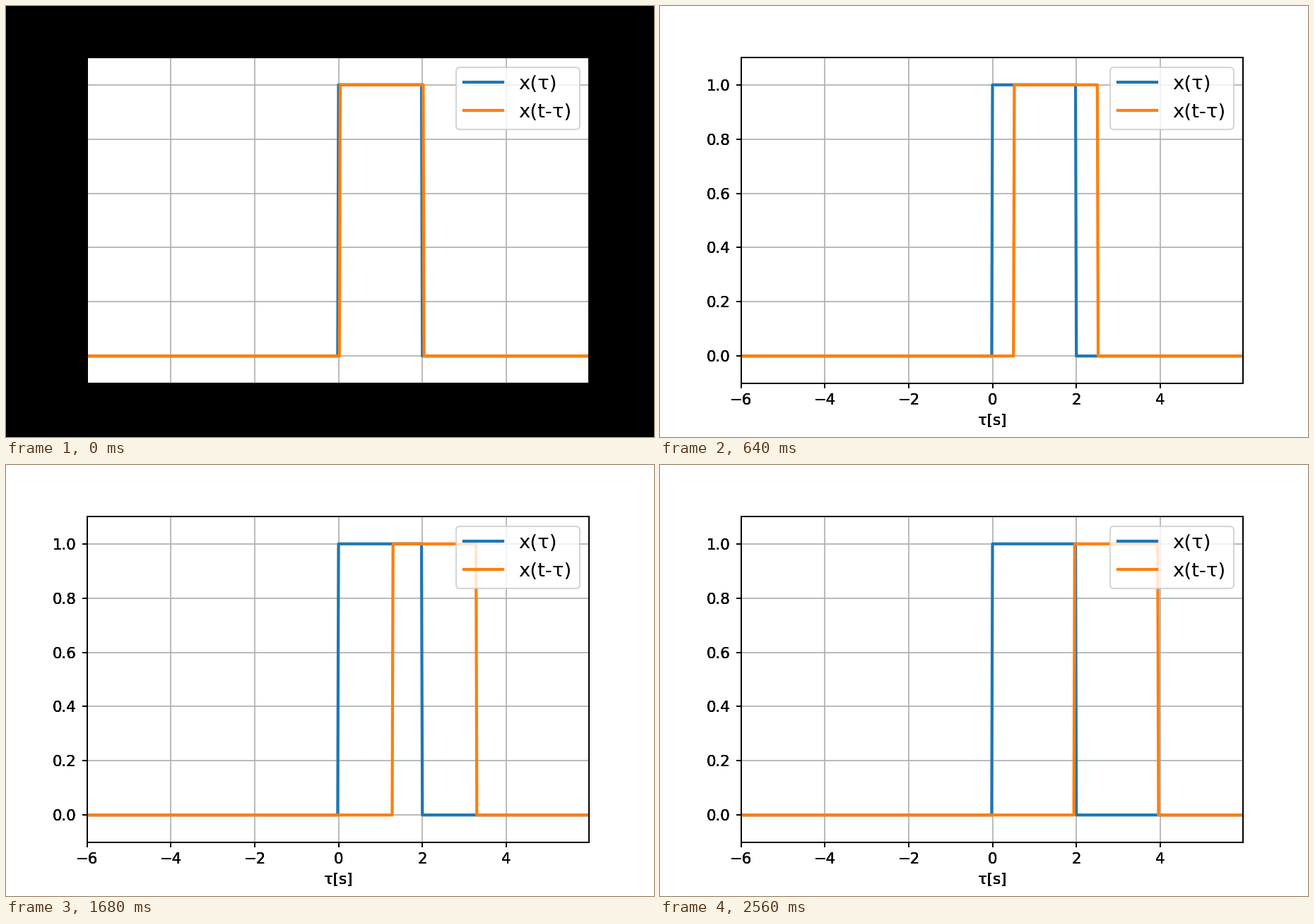
Recreate the animation shown at these times as a matplotlib script. Size 917 by 611 pixels, loop 2.64 s.

```python
import matplotlib.pyplot as plt
import numpy as np
from matplotlib.animation import FuncAnimation

WIDTH, HEIGHT, DPI = 917, 611, 152.75
FRAMES, INTERVAL = 33, 80
STEP = 0.02        # sampling interval of the time axis in seconds
PULSE = 100        # pulse length in samples
START, SPEED = 101, 3   # first shift and shift per frame, in samples
BOX = (0.125, 0.125, 0.775, 0.755)

plt.rcParams.update({"font.family": "DejaVu Sans", "font.size": 10})

n = np.arange(-300, 300)
tau = n * STEP


def pulse(k):
    return ((k >= 0) & (k < PULSE)).astype(float)


def add_panel(facecolor):
    ax = fig.add_axes(BOX, facecolor=facecolor, label=f"panel{len(fig.axes)}")
    ax.set(xlim=(tau[0], tau[-1]), ylim=(-0.1, 1.1),
           xticks=np.arange(-6, 5, 2), yticks=np.linspace(0, 1, 6),
           xlabel="τ[s]")
    return ax


fig = plt.figure(figsize=((WIDTH + 1e-4) / DPI, (HEIGHT + 1e-4) / DPI), dpi=DPI)
ax = add_panel("white")
ax.grid(True)
ax.plot(tau, pulse(n), color="C0", lw=2, label="x(τ)")
moving, = ax.plot(tau, pulse(START - n), color="C1", lw=2, label="x(t-τ)")
ax.legend(loc="upper right", fontsize=13)

# Stacked copies of the frame and labels give their hard, dark edges.
for _ in range(3):
    add_panel("none")


def update(i):
    fig.set_facecolor("black" if i == 0 else "white")
    moving.set_ydata(pulse(START + SPEED * i - n))
    return moving,


anim = FuncAnimation(fig, update, frames=FRAMES, interval=INTERVAL,
                     init_func=lambda: update(0), repeat=True,
                     repeat_delay=0, blit=False)
plt.show()
```
